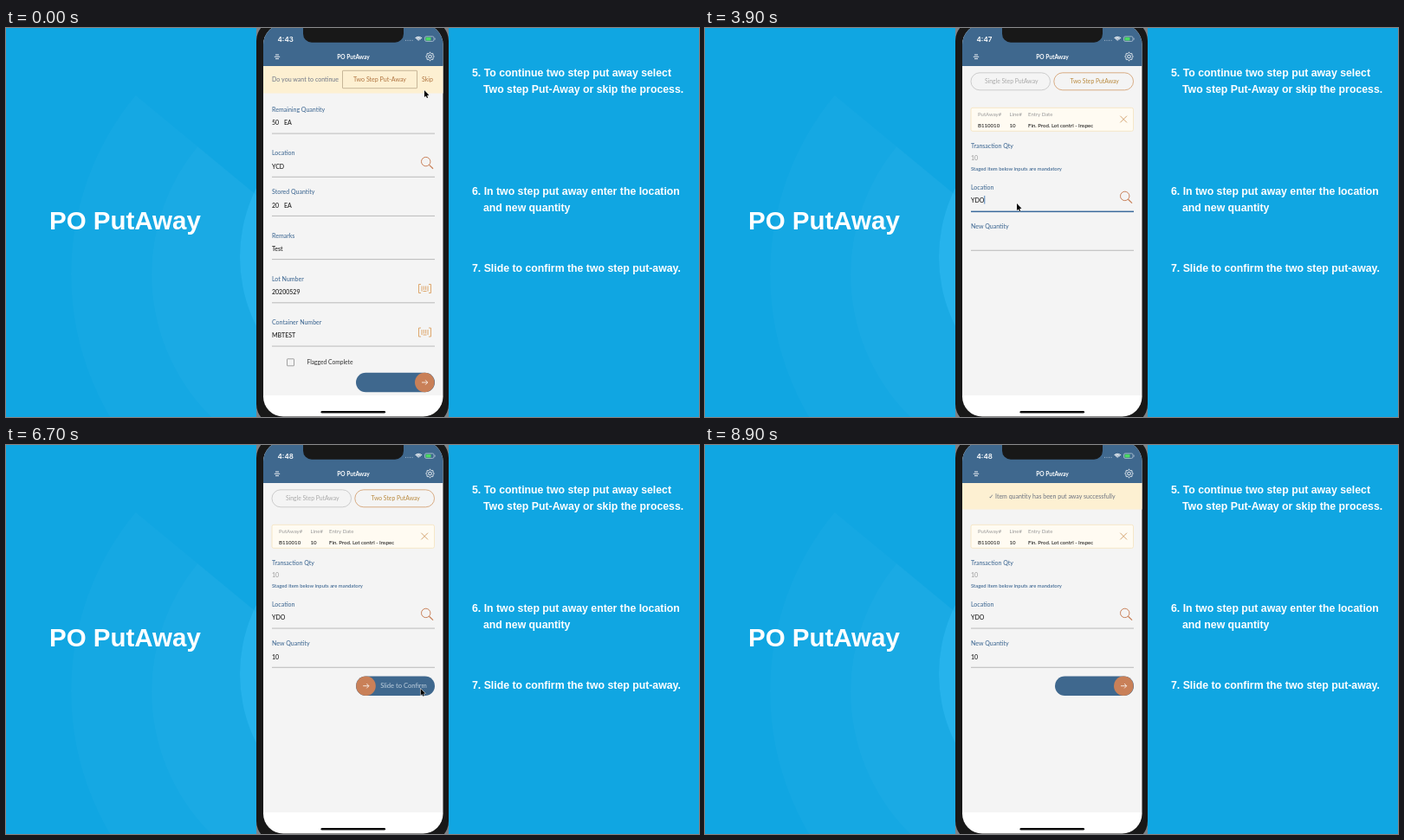
These frames come from a looping animation (800 px wide and 450 px high, 9.9 s). An HTML page with a canvas:

```html
<!DOCTYPE html>
<html lang="en">
<head>
<meta charset="utf-8">
<title>PO PutAway</title>
<style>
html, body { margin: 0; width: 100%; height: 100%; overflow: hidden; background: #10a6e2; }
canvas { display: block; width: 800px; height: 450px; }
</style>
</head>
<body>
<canvas id="stage"></canvas>
<script>
const LOOP = 9900;
const canvas = document.getElementById('stage');
const ctx = canvas.getContext('2d');
const dpr = window.devicePixelRatio || 1;
canvas.width = 800 * dpr;
canvas.height = 450 * dpr;

const BLUE = '#3f688e', LABEL = '#456d96', INK = '#1c1c1c', GRAY = '#9a9a9a';
const ORANGE = '#c98058', GOLD = '#b98a3e', RULE = '#b4b4b4', CREAM = '#fdf0d2';
const LATO = 'Lato, sans-serif', SANS = '"Liberation Sans", Arial, sans-serif', UI = 'Inter, sans-serif';

// Piecewise linear value of time: keys are [time, value, ...].
function track(t, keys) {
  if (t <= keys[0][0]) return keys[0].slice(1);
  for (let i = 1; i < keys.length; i++) {
    const a = keys[i - 1], b = keys[i];
    if (t < b[0]) {
      const k = (t - a[0]) / (b[0] - a[0]);
      return a.slice(1).map((v, j) => v + (b[j + 1] - v) * k);
    }
  }
  return keys[keys.length - 1].slice(1);
}

function text(str, x, y, size, color, opt = {}) {
  ctx.font = `${opt.weight || 400} ${size}px ${opt.font || LATO}`;
  ctx.textAlign = opt.align || 'left';
  ctx.letterSpacing = (opt.spacing || 0) + 'px';
  ctx.fillStyle = color;
  ctx.fillText(str, x, y);
  ctx.letterSpacing = '0px';
}

function rect(x, y, w, h, fill) {
  ctx.fillStyle = fill;
  ctx.fillRect(x, y, w, h);
}

function round(x, y, w, h, r, fill, stroke) {
  ctx.beginPath();
  ctx.roundRect(x, y, w, h, r);
  if (fill) { ctx.fillStyle = fill; ctx.fill(); }
  if (stroke) { ctx.strokeStyle = stroke; ctx.lineWidth = 0.8; ctx.stroke(); }
}

function disc(x, y, r, fill) {
  ctx.beginPath();
  ctx.arc(x, y, r, 0, Math.PI * 2);
  ctx.fillStyle = fill;
  ctx.fill();
}

// Each path is a flat list of x, y pairs.
function strokes(color, width, ...paths) {
  ctx.strokeStyle = color;
  ctx.lineWidth = width;
  ctx.beginPath();
  for (const p of paths) {
    ctx.moveTo(p[0], p[1]);
    for (let i = 2; i < p.length; i += 2) ctx.lineTo(p[i], p[i + 1]);
  }
  ctx.stroke();
}

function backdrop() {
  rect(0, 0, 800, 450, '#10a6e2');
  ctx.fillStyle = 'rgba(255,255,255,0.018)';
  for (const r of [325, 232]) {
    ctx.beginPath();
    ctx.moveTo(400, 285);
    ctx.arc(400, 285, r, Math.PI * 0.5, Math.PI * 1.22);
    ctx.fill();
  }
  disc(448, 265, 178, 'rgba(70,200,255,0.28)');
  rect(511, 0, 289, 450, '#10a6e2');

  text('PO PutAway', 50, 233, 29.5, '#fff', { weight: 700, font: SANS });
  const notes = [
    ['5. To continue two step put away select', 538, 56],
    ['Two step Put-Away or skip the process.', 551, 75],
    ['6. In two step put away enter the location', 538, 193],
    ['and new quantity', 551, 212],
    ['7. Slide to confirm the two step put-away.', 538, 282]
  ];
  for (const [s, x, y] of notes) text(s, x, y, 12.3, '#fff', { weight: 700, font: SANS });
}

function gear(x, y) {
  ctx.strokeStyle = '#fff';
  ctx.lineWidth = 0.9;
  ctx.beginPath();
  for (let i = 0; i <= 64; i++) {
    const a = i / 64 * Math.PI * 2, r = 4.2 + 0.6 * Math.cos(8 * a);
    ctx.lineTo(x + r * Math.cos(a), y + r * Math.sin(a));
  }
  ctx.stroke();
  ctx.beginPath();
  ctx.arc(x, y, 1.8, 0, 7);
  ctx.stroke();
}

function header(clock) {
  rect(296, 0, 209, 44, BLUE);
  text(clock, 313.5, 15.5, 8, '#fff', { weight: 600, font: UI });
  text('PO PutAway', 401, 36, 6.6, '#fff', { align: 'center', weight: 700 });
  for (let i = 0; i < 4; i++) disc(461.5 + i * 2.5, 14.3, 0.55, '#b8c8d8');
  for (const r of [1.4, 3.2, 5]) {
    ctx.beginPath();
    ctx.arc(476.3, 15.2, r, -Math.PI * 0.76, -Math.PI * 0.24);
    ctx.strokeStyle = '#fff';
    ctx.lineWidth = 1.1;
    ctx.stroke();
  }
  round(483.5, 9.8, 10.5, 5.6, 1.6, null, '#b9cbd9');
  round(484.5, 10.7, 6, 3.8, 0.8, '#4cd964');
  rect(494.7, 11.6, 0.8, 2, '#b9cbd9');
  strokes('#fff', 0.9, [311, 31, 315, 31], [309.8, 33.3, 316.2, 33.3], [311, 35.6, 315, 35.6]);
  gear(489.5, 33);
}

function lens(x, y) {
  ctx.beginPath();
  ctx.arc(x - 1.3, y - 1.4, 5.2, 0, 7);
  ctx.strokeStyle = ORANGE;
  ctx.lineWidth = 1;
  ctx.stroke();
  strokes(ORANGE, 1.2, [x + 2.5, y + 2.4, x + 7, y + 6.8]);
}

function scanner(y) {
  strokes('#dca05f', 0.9,
    [479, y - 5, 476.5, y - 5, 476.5, y + 5, 479, y + 5],
    [488, y - 5, 490.5, y - 5, 490.5, y + 5, 488, y + 5],
    [480, y - 3, 480, y + 3], [482.3, y - 3, 482.3, y + 1.5],
    [484.6, y - 3, 484.6, y + 1.5], [487, y - 3, 487, y + 3],
    [481.5, y + 3, 485.5, y + 3]);
}

function field(label, value, y, focus) {
  text(label, 307, y, 7, LABEL, { weight: 500 });
  text(value, 307, y + 15.3, 7, INK, { weight: 500 });
  rect(307, y + 24.6, 188, focus ? 1.5 : 0.9, focus ? '#3b6a9b' : RULE);
}

function slider(y, thumbX, textAlpha) {
  round(404, y - 11.3, 91, 22.6, 11.3, BLUE);
  if (textAlpha > 0) {
    text('Slide to Confirm', 459, y + 2.6, 7.6, `rgba(190,207,222,${textAlpha})`, { align: 'center' });
  }
  disc(thumbX, y, 11.3, ORANGE);
  strokes('#fff', 0.8, [thumbX - 3.3, y, thumbX + 3.3, y],
    [thumbX + 0.8, y - 2.7, thumbX + 3.4, y, thumbX + 0.8, y + 2.7]);
}

function receiptScreen(banner) {
  const heads = [['Receiving #', '2000245001', 307], ['Received Qty', '100 EA', 373], ['Approved Qty', '100 EA', 437]];
  for (const [h, v, x] of heads) {
    text(h, x, 52.5, 7, LABEL, { weight: 500 });
    text(v, x, 72.5, 6.6, GRAY);
  }
  field('Remaining Quantity', '50', 97, false);
  field('Location', 'YCD', 147.2, false);
  field('Stored Quantity', '20', 192.3, false);
  field('Remarks', 'Test', 242.6, false);
  field('Lot Number', '20200529', 292.8, false);
  field('Container Number', 'MBTEST', 343, false);
  text('EA', 321, 112.3, 7, INK, { weight: 500 });
  text('EA', 321, 207.6, 7, INK, { weight: 500 });
  lens(486, 156);
  scanner(301.5);
  scanner(352);
  round(324.5, 382.8, 8, 8, 0.5, null, '#8c8c8c');
  text('Flagged Complete', 347.5, 389.3, 6.7, '#333');
  slider(410, 483.3, 0);
  if (banner) {
    rect(296, 43.5, 209, 32, CREAM);
    text('Do you want to continue', 307, 62, 7.05, '#6f7787');
    round(388.5, 49.3, 86, 20.4, 0.5, null, '#b9a88a');
    text('Two Step Put-Away', 431.5, 62, 7.05, '#b0733f', { align: 'center' });
    text('Skip', 480, 62, 7.05, '#b0733f');
  }
}

function pill(x, w, label, color, border) {
  round(x, 51.8, w, 20, 10, null, border);
  text(label, x + w / 2 + 1, 64.2, 6.8, color, { align: 'center' });
}

function typed(str, t, times) {
  return str.slice(0, times.filter(at => t >= at).length);
}

function caret(value, y) {
  ctx.font = `500 7px ${LATO}`;
  rect(307 + ctx.measureText(value).width, y, 0.9, 9.5, '#3f78b5');
}

function stepScreen(t) {
  const place = typed('YDO', t, [3200, 3500, 3800]);
  const amount = typed('10', t, [5200, 5400]);
  const onPlace = t >= 2600 && t < 4600, onAmount = t >= 4600 && t < 6100;

  pill(307, 91.5, 'Single Step PutAway', '#a9a9a9', '#c2c2c2');
  pill(402.8, 91.7, 'Two Step PutAway', GOLD, '#d19a68');

  round(307, 92.3, 187.5, 27, 2, '#fffbf2', '#f4e3bd');
  [['PutAway#', 'B110010', 315], ['Line#', '10', 351.5], ['Entry Date', 'Fin. Prod. Lot contrl - Inspec', 373]]
    .forEach(([h, v, x]) => {
      text(h, x, 101.6, 6, GRAY);
      text(v, x, 115, 6.1, INK, { weight: 500 });
    });
  strokes('#cf9a62', 0.9, [479.3, 101.7, 487, 109.4], [487, 101.7, 479.3, 109.4]);

  text('Transaction Qty', 307, 138.8, 7, LABEL, { weight: 500 });
  text('10', 307, 153, 7, GRAY);
  text('Staged item below inputs are mandatory', 307, 165.4, 5.9, LABEL, { weight: 600 });
  field('Location', place, 187, onPlace);
  lens(486, 195.8);
  field('New Quantity', amount, 232.2, onAmount);
  if (onPlace) caret(place, 194);
  if (onAmount) caret(amount, 239.5);

  if (t >= 6100) {
    const [x] = track(t, [[7400, 415.5], [7500, 433], [7600, 453.5], [7700, 474], [7800, 483.3]]);
    slider(278.7, x, 1 - (x - 415.5) / 67.8);
  }

  const [drop] = track(t, [[4700, 178], [4800, 106], [4900, 40.5], [5000, 10], [5100, 0],
    [6050, 0], [6150, 45], [6250, 115], [6350, 178]]);
  if (drop < 178) keyboard(drop);

  if (t >= 8500) {
    const [rise] = track(t, [[8500, -22], [8700, 0]]);
    ctx.save();
    ctx.beginPath();
    ctx.rect(296, 43.5, 209, 60);
    ctx.clip();
    rect(296, 43.5 + rise, 209, 31, CREAM);
    text('✓ Item quantity has been put away successfully', 400.5, 62 + rise, 7, '#6b7280', { align: 'center' });
    ctx.restore();
  }
}

function keyboard(drop) {
  ctx.save();
  ctx.translate(0, drop);
  rect(296, 298, 209, 160, '#d0d3da');
  rect(296, 274, 209, 24.6, BLUE);
  text('Clear', 307, 289.3, 9.1, '#b27d42');
  text('Cancel', 430, 289.3, 9.1, '#b27d42');
  text('Done', 473, 289.3, 9.1, '#b27d42');

  const letters = ['', 'ABC', 'DEF', 'GHI', 'JKL', 'MNO', 'PQRS', 'TUV', 'WXYZ'];
  const key = (col, row, digit, sub) => {
    const x = 300 + col * 68.2, y = 301.3 + row * 28.2;
    round(x, y + 0.9, 65.3, 24.4, 3, '#8d9096');
    round(x, y, 65.3, 24.4, 3, '#fff');
    text(digit, x + 32.6, y + (row === 3 ? 16.9 : 13.6), 13, '#111', { font: UI, align: 'center' });
    if (sub) text(sub, x + 33, y + 20.8, 4.8, '#111', { font: UI, align: 'center', weight: 600, spacing: 0.6 });
  };
  letters.forEach((s, i) => key(i % 3, Math.floor(i / 3), String(i + 1), s));
  key(1, 3, '0', '');
  disc(330.7, 400.4, 0.9, '#111');
  ctx.lineJoin = 'round';
  strokes('#222', 0.9, [464.5, 397.5, 468, 393.5, 475.5, 393.5, 475.5, 401.5, 468, 401.5, 464.5, 397.5],
    [469.6, 395.6, 473.2, 399.4], [473.2, 395.6, 469.6, 399.4]);
  ctx.restore();
}

function loading(t) {
  rect(296, 0, 209, 450, 'rgba(80,80,80,0.46)');
  const head = Math.floor(t / 100);
  ctx.lineCap = 'round';
  for (let i = 0; i < 12; i++) {
    const a = i * Math.PI / 6, c = Math.cos(a), s = Math.sin(a);
    const fade = ((i - head) % 12 + 12) % 12 / 11;
    strokes(`rgba(255,255,255,${0.25 + 0.65 * fade})`, 1,
      [400.5 + 2.6 * c, 227 + 2.6 * s, 400.5 + 4.8 * c, 227 + 4.8 * s]);
  }
  ctx.lineCap = 'butt';
}

function pointer(t) {
  if (t >= 8000) return;
  const [x, y] = track(t, [[0, 483, 72], [100, 476, 70], [400, 438, 61], [500, 438, 61], [700, 388, 441],
    [1850, 388, 441], [2000, 372, 226], [2200, 366, 215], [2400, 360, 203], [4100, 360, 203],
    [4500, 343, 246], [5500, 343, 246], [5800, 496, 283], [6100, 496, 283], [7000, 470, 281],
    [7300, 417, 277], [7400, 420, 277], [7600, 475, 277], [7750, 490, 277]]);
  ctx.save();
  ctx.translate(x, y);
  ctx.beginPath();
  [[0, 0], [0, 8], [1.8, 6.4], [3, 9], [4.2, 8.4], [3.1, 6], [5.5, 5.8]].forEach(p => ctx.lineTo(...p));
  ctx.closePath();
  ctx.lineJoin = 'round';
  ctx.strokeStyle = '#fff';
  ctx.lineWidth = 1;
  ctx.stroke();
  ctx.fillStyle = '#000';
  ctx.fill();
  ctx.restore();
}

function draw(t) {
  ctx.setTransform(dpr, 0, 0, dpr, 0, 0);
  backdrop();
  rect(289, 0, 222, 450, '#7d8287');
  round(289, -9, 222, 468, 24, '#181818');

  ctx.save();
  ctx.beginPath();
  ctx.roundRect(297, -4, 207.5, 453.5, 23);
  ctx.clip();
  rect(296, 0, 209, 425, '#f4f4f4');
  rect(296, 425, 209, 25, '#fff');
  if (t < 1600) receiptScreen(t < 900);
  else stepScreen(t);
  header(t < 1600 ? '4:43' : t < 5300 ? '4:47' : '4:48');
  if ((t >= 900 && t < 1600) || (t >= 8000 && t < 8300)) loading(t);
  ctx.restore();

  round(343, -12, 116, 28.8, 10, '#181818');
  round(363.5, 443, 74.5, 2.6, 1.3, '#0a0a0a');
  pointer(t);
}

const start = performance.now();
function tick() {
  draw((performance.now() - start) % LOOP);
  requestAnimationFrame(tick);
}
tick();
</script>
</body>
</html>
```
